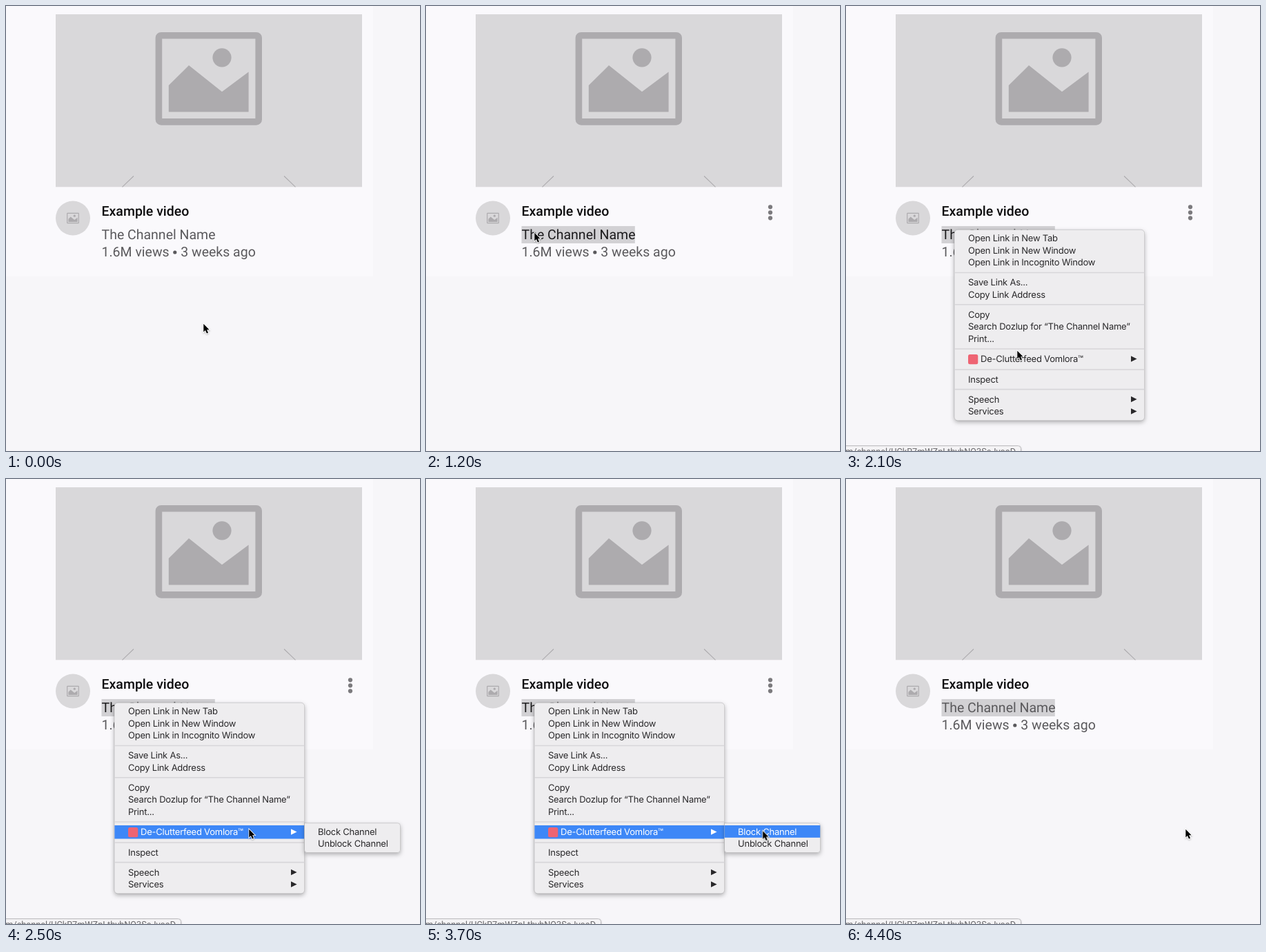
Animation, 600 px wide and 645 px high, one loop 4500 ms. Source, as an HTML page:

```html
<!DOCTYPE html>
<html lang="en">
<head>
<meta charset="utf-8">
<title>Block a channel</title>
<style>
html, body { margin: 0; width: 100%; height: 100%; overflow: hidden; background: #f7f6f9; }
svg { display: block; width: 600px; height: 645px; }
text { text-rendering: geometricPrecision; white-space: pre; }

.page { font: 19.5px Roboto, Arial, sans-serif; fill: #5a595c; }
.title { font-weight: 500; fill: #0c0c0d; }
.menu { font: 13px Inter, "Liberation Sans", sans-serif; letter-spacing: -.23px; fill: #29282a; }
.panel { fill: #eeedef; stroke: #000; stroke-opacity: .2; stroke-width: .7; }
.rule { stroke: #d7d6d9; stroke-width: 1.6; }
.blue { fill: #3d87f7; }

/* one loop is 45 ticks of 100 ms */
.anim, .menu, .link { animation: 4.5s step-end infinite; }
.hover { animation-name: hover; }
.select { animation-name: select; }
.status { animation-name: status; }
.menu { animation-name: menu; }
.row { animation-name: row; }
.sub { animation-name: sub; }
.item { animation-name: item; }
.rowtext { animation-name: rowtext; }
.itemtext { animation-name: itemtext; }
.link { animation-name: link; }
.cursor { animation: move 4.5s steps(1, end) infinite; }

@keyframes hover { 0% { opacity: 0 } 26.667% { opacity: 1 } 97.778%, 100% { opacity: 0 } }
@keyframes select { 0% { opacity: 0 } 26.667%, 100% { opacity: 1 } }
@keyframes status { 0% { opacity: 0 } 28.889%, 100% { opacity: 1 } }
@keyframes link { 0% { fill: #5a595c } 26.667% { fill: #1c1b1d } 97.778%, 100% { fill: #5a595c } }
@keyframes menu {
  0% { opacity: 0 } 28.889% { opacity: 1 } 91.111% { opacity: .95 }
  93.333% { opacity: .6 } 95.556% { opacity: .25 } 97.778%, 100% { opacity: 0 }
}
@keyframes row { 0% { opacity: 0 } 48.889%, 100% { opacity: 1 } }
@keyframes sub { 0% { opacity: 0 } 53.333%, 100% { opacity: 1 } }
@keyframes item { 0% { opacity: 0 } 60%, 100% { opacity: 1 } }
@keyframes rowtext { 0% { fill: #29282a } 48.889%, 100% { fill: #fff } }
@keyframes itemtext { 0% { fill: #29282a } 60%, 100% { fill: #fff } }
@keyframes move {
  0% { transform: translate(286px, 460px) }
  2.222% { transform: translate(277px, 451px); animation-timing-function: steps(4, end) }
  11.111% { transform: translate(176px, 344px) }
  13.333% { transform: translate(165px, 333px) }
  15.556% { transform: translate(160px, 330px) }
  17.778% { transform: translate(157px, 328px) }
  35.556% { transform: translate(157px, 328px) }
  37.778% { transform: translate(170px, 364px); animation-timing-function: steps(3, end) }
  44.444% { transform: translate(239px, 482px) }
  46.667% { transform: translate(248px, 499px); animation-timing-function: steps(3, end) }
  53.333% { transform: translate(310px, 505px); animation-timing-function: steps(3, end) }
  60% { transform: translate(436px, 511px); animation-timing-function: steps(2, end) }
  64.444% { transform: translate(470px, 511px); animation-timing-function: steps(2, end) }
  68.889% { transform: translate(477px, 510px); animation-timing-function: steps(4, end) }
  77.778% { transform: translate(485px, 511px); animation-timing-function: steps(5, end) }
  88.889%, 100% { transform: translate(492px, 507px) }
}
</style>
</head>
<body>
<svg viewBox="0 0 600 645">
  <defs>
    <filter id="shade" x="-20%" y="-20%" width="140%" height="150%">
      <feDropShadow dx="0" dy="2.5" stdDeviation="3.2" flood-color="#000" flood-opacity=".3"/>
    </filter>
    <filter id="soft" x="-50%" y="-50%" width="200%" height="200%">
      <feDropShadow dx="0" dy="1" stdDeviation=".8" flood-color="#000" flood-opacity=".3"/>
    </filter>
  </defs>

  <rect width="600" height="645" fill="#f7f6f9"/>
  <rect width="532" height="392" fill="#faf9fc"/>

  <!-- video card -->
  <rect x="72" y="12" width="444" height="250.3" fill="#d9d8da"/>
  <g fill="#adabae">
    <rect x="221.4" y="42.7" width="144.8" height="125.2" rx="3.5" fill="none" stroke="#adabae" stroke-width="9.6"/>
    <path d="M235.8 115 265 86 313 124.3 351.6 95.5V153.4H235.8Z"/>
    <circle cx="313" cy="74.8" r="13.6"/>
    <path d="M168.5 262.3 185 246.5M403 246.5 419.5 262.3" stroke="#adabae" stroke-width="1.1"/>
  </g>
  <circle cx="97" cy="307.5" r="25" fill="#d9d8da"/>
  <g fill="#adabae">
    <rect x="88.7" y="300.3" width="16.6" height="14.4" rx=".5" fill="none" stroke="#adabae" stroke-width="1.2"/>
    <path d="M90.4 308.8 93.7 305.6 99.2 309.9 103.6 306.7V313H90.4Z"/>
    <circle cx="99.3" cy="304.2" r="1.6"/>
  </g>
  <g class="anim hover" fill="#7b7a7d">
    <circle cx="499" cy="291.3" r="3.1"/>
    <circle cx="499" cy="299.3" r="3.1"/>
    <circle cx="499" cy="307.3" r="3.1"/>
  </g>
  <rect class="anim select" x="138.5" y="319" width="164.3" height="25" fill="#d2d1d4"/>
  <g class="page">
    <text class="title" x="138.5" y="304">Example video</text>
    <text class="link" x="138.5" y="338.2">The Channel Name</text>
    <text x="138.5" y="363.4">1.6M views</text>
    <circle cx="244.8" cy="357" r="2.6"/>
    <text x="253.2" y="363.4">3 weeks ago</text>
  </g>

  <!-- link address -->
  <g class="anim status">
    <path d="M-10 637.5H249.5Q253.5 637.5 253.5 641.5V660H-10Z" fill="#f4f3f5" stroke="#bcbbbe" filter="url(#soft)"/>
    <text x="246" y="650.3" text-anchor="end" font-family="Roboto, Arial, sans-serif" font-size="12.7" fill="#6a696c">be.com/channel/UCkR7mWZpLtbyhNQ3SeJvoaD</text>
  </g>

  <!-- context menu -->
  <g class="menu">
    <rect class="panel" x="157" y="324.3" width="275.6" height="276.5" rx="5" filter="url(#shade)"/>
    <path class="rule" d="M157.4 386.5H432.2M157.4 432.7H432.2M157.4 497H432.2M157.4 527H432.2M157.4 555.6H432.2"/>
    <text x="177" y="341.2">Open Link in New Tab</text>
    <text x="177" y="358.8">Open Link in New Window</text>
    <text x="177" y="376.4">Open Link in Incognito Window</text>
    <text x="177" y="405.2">Save Link As...</text>
    <text x="177" y="422.8">Copy Link Address</text>
    <text x="177" y="451.6">Copy</text>
    <text x="177" y="469.2">Search Dozlup for “The Channel Name”</text>
    <text x="177" y="486.8">Print...</text>
    <rect class="anim row blue" x="157.4" y="502" width="274.8" height="19.5"/>
    <rect x="177" y="505" width="14.3" height="14.3" rx="2.5" fill="#ee6473"/>
    <g class="anim rowtext">
      <text x="195" y="516.2">De-Clutterfeed Vomlora™</text>
      <path d="M413 507.2 421.6 511.5 413 515.8Z"/>
    </g>
    <text x="177" y="546.2">Inspect</text>
    <text x="177" y="574.6">Speech</text>
    <text x="177" y="592.2">Services</text>
    <path d="M413 565.7 421.6 570 413 574.3ZM413 583.2 421.6 587.5 413 591.8Z"/>

    <g class="anim sub">
      <path class="panel" d="M432.5 498.7H567.5Q571.5 498.7 571.5 502.7V537.5Q571.5 541.5 567.5 541.5H436.5Q432.5 541.5 432.5 537.5Z" filter="url(#shade)"/>
      <rect class="anim item blue" x="432.5" y="502" width="138.7" height="17.8"/>
      <text class="anim itemtext" x="452" y="515.6">Block Channel</text>
      <text x="452" y="533.2">Unblock Channel</text>
    </g>
  </g>

  <g class="cursor">
    <path d="M.3.8V12.5L2.9 10 4.9 14.6 7 13.7 5.1 9.2H8.6Z" fill="#000" stroke="#fff" stroke-width="1.6" paint-order="stroke" filter="url(#soft)"/>
  </g>
</svg>
</body>
</html>
```
